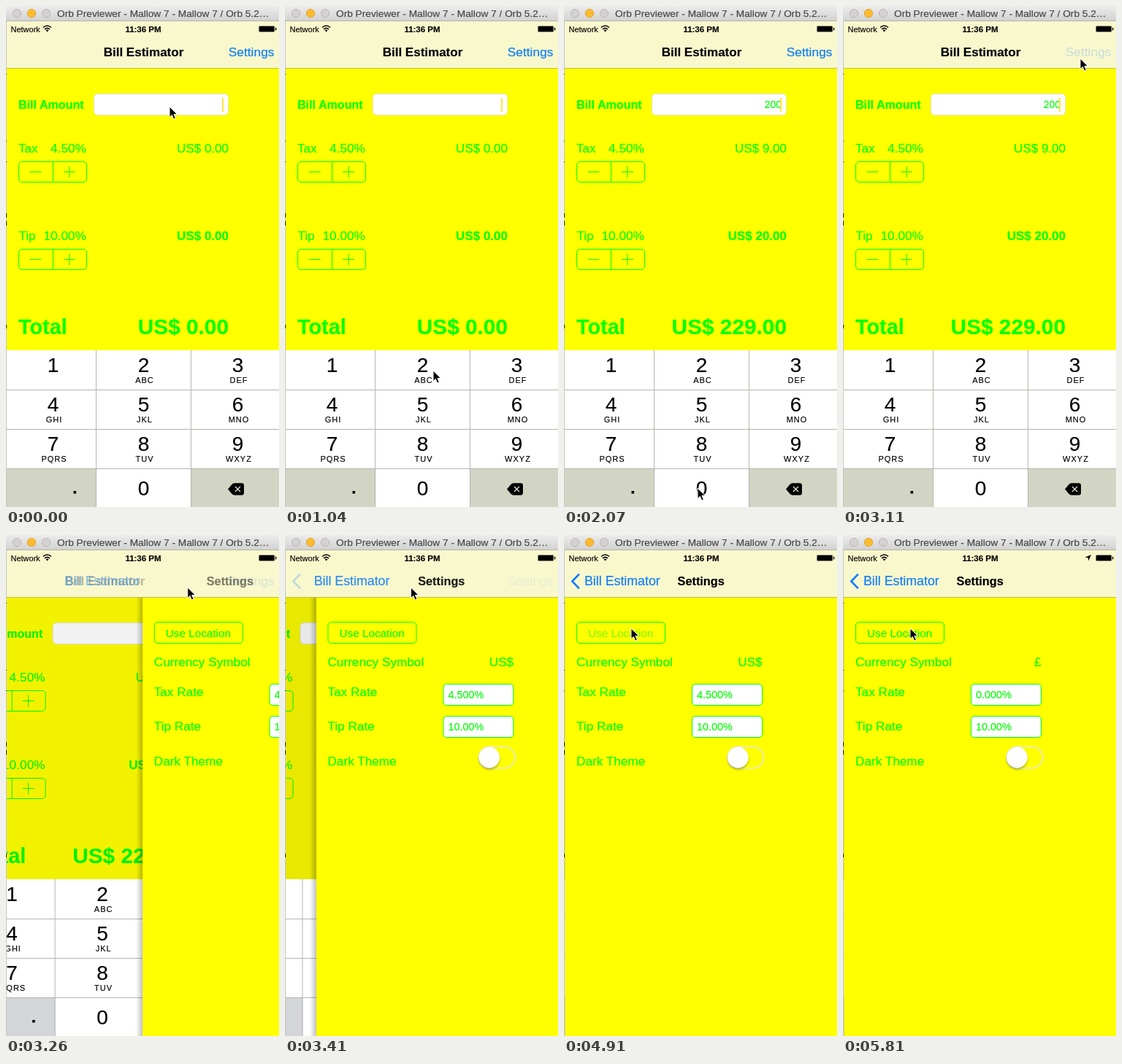
Recreate the animation shown at these times as an HTML page. Size 374x687 px, loop 8 s.

```html
<!DOCTYPE html>
<html lang="en">
<head>
<meta charset="utf-8">
<title>Bill Estimator</title>
<style>
  html, body { margin: 0; width: 100%; height: 100%; overflow: hidden; background: #ff0; }
  svg { display: block; width: 100%; height: 100%; }
  text { font-family: "Liberation Sans", Arial, Helvetica, sans-serif; white-space: pre; }
</style>
</head>
<body>
<svg id="stage" viewBox="0 0 374 687">
  <defs>
    <linearGradient id="chrome" x2="0" y2="1">
      <stop stop-color="#ececec"/><stop offset="1" stop-color="#d2d2d2"/>
    </linearGradient>
    <linearGradient id="edge">
      <stop stop-color="#000" stop-opacity="0"/><stop offset="1" stop-color="#000" stop-opacity=".25"/>
    </linearGradient>
    <filter id="soft" x="-50%" y="-50%" width="200%" height="200%">
      <feDropShadow dx="0" dy="2.5" stdDeviation="1.5" flood-opacity=".3"/>
    </filter>
    <clipPath id="screen"><rect x="1" y="21" width="373" height="666"/></clipPath>
  </defs>
</svg>
<script>
const GREEN = '#00ff00', BLUE = '#0a7aff', LOOP = 8000;
const stage = document.getElementById('stage');

function add(parent, tag, attrs, content) {
  const node = document.createElementNS('http://www.w3.org/2000/svg', tag);
  for (const key in attrs) node.setAttribute(key, attrs[key]);
  if (content !== undefined) node.textContent = content;
  parent.appendChild(node);
  return node;
}
const group = (parent, attrs = {}) => add(parent, 'g', attrs);
const rect = (parent, x, y, width, height, fill, more = {}) =>
  add(parent, 'rect', { x, y, width, height, fill, ...more });
const path = (parent, d, stroke, width = 1, fill = 'none') =>
  add(parent, 'path', { d, stroke, 'stroke-width': width, fill });
const label = (parent, str, x, y, size, fill = GREEN, more = {}) =>
  add(parent, 'text', { x, y, 'font-size': size, fill, stroke: fill, 'stroke-width': .15, ...more }, str);

const BOLD = { 'font-weight': 700 };
const END = { 'text-anchor': 'end' };
const MID = { 'text-anchor': 'middle' };
const box = { stroke: GREEN, rx: 4.5 };

// Calculator view
const screen = group(stage, { 'clip-path': 'url(#screen)' });
const calc = group(screen);
rect(calc, 0, 85, 374, 602, '#ff0');
label(calc, 'Bill Amount', 17, 141, 16.1, GREEN, BOLD);
rect(calc, 120.5, 120.5, 184, 29, '#fff', { rx: 5, stroke: '#e4e4c8' });
const bill = label(calc, '', 298, 140, 14, GREEN, END);
const caret = rect(calc, 296, 126, 2, 19, '#ffe63c');

function stepper(y) {
  rect(calc, 17.5, y + .5, 93, 28, 'none', box);
  path(calc, `M64.5 ${y + 1}v28M32.5 ${y + 14.5}h16M79 ${y + 14.5}h16M87 ${y + 6.5}v16`, GREEN);
}
label(calc, 'Tax', 17, 201, 17);
label(calc, '4.50%', 110, 201, 17.3, GREEN, END);
stepper(213);
label(calc, 'Tip', 17.5, 321, 17);
label(calc, '10.00%', 110, 321, 17.3, GREEN, END);
stepper(333);
label(calc, 'Total', 17, 450, 28.8, GREEN, BOLD);
const tax = label(calc, '', 305, 201, 17, GREEN, END);
const tip = label(calc, '', 305, 321, 17, GREEN, { ...END, ...BOLD });
const total = label(calc, '', 305, 450, 29.8, GREEN, { ...END, ...BOLD });
const dim = rect(calc, 0, 85, 374, 387, '#000', { opacity: 0 });

// Number pad
const cols = [[0, 124, 64.5], [124, 130, 188.5], [254, 120, 317.5]];
const letters = ['', 'ABC', 'DEF', 'GHI', 'JKL', 'MNO', 'PQRS', 'TUV', 'WXYZ'];
rect(calc, 0, 472, 374, 215, '#fff');
const sideKeys = [0, 2].map(c => rect(calc, cols[c][0], 634, cols[c][1], 53, '#d2d5c3'));
const pressed = {
  2: rect(calc, 124, 472, 130, 54, '#d2d5c3'),
  0: rect(calc, 124, 634, 130, 53, '#d2d5c3')
};
path(calc, 'M0 526.5H374M0 580.5H374M0 634.5H374M123.5 472V687M253.5 472V687', '#b4b4b0');
letters.forEach((str, i) => {
  const x = cols[i % 3][2], y = 472 + 54 * Math.floor(i / 3);
  label(calc, i + 1, x, y + 30, 28, '#000', MID);
  label(calc, str, x + 1.5, y + 45, 11, '#000', { ...MID, 'letter-spacing': 1 });
});
label(calc, '0', 188.5, 671, 28, '#000', MID);
rect(calc, 92.5, 665, 3.6, 3.6, '#000');
path(calc, 'M304 662.5l5.5-6.5q1.5-1.8 3.5-1.8h10q3 0 3 3v10.6q0 3-3 3h-10q-2 0-3.5-1.8z', 'none', 0, '#000');
path(calc, 'M314 659l7 7M321 659l-7 7', '#e8eadc', 1.2);

// Settings view
const prefs = group(screen);
rect(prefs, -7.5, 85, 9, 602, 'url(#edge)');
rect(prefs, 1.5, 85, 380, 602, '#ff0');
rect(prefs, 17.5, 119.5, 121, 29, 'none', box);
const locate = label(prefs, 'Use Location', 33, 140, 15.3);
[['Currency Symbol', 180], ['Tax Rate', 221], ['Tip Rate', 268], ['Dark Theme', 316]]
  .forEach(([str, y]) => label(prefs, str, 17, y, 17.2));
const symbol = label(prefs, '', 271.5, 180, 17, GREEN, END);
function field(y) {
  rect(prefs, 175.5, y + .5, 96, 29, '#fff', box);
  return label(prefs, '10.00%', 182, y + 20, 14.4);
}
const taxRate = field(204);
field(248);
rect(prefs, 224, 290.2, 49.5, 29.6, 'none', { rx: 14.8, stroke: '#e5e5e5', 'stroke-width': 1.5 });
add(prefs, 'circle', { cx: 238.5, cy: 305, r: 14.2, fill: '#fff', filter: 'url(#soft)' });

// Navigation and status bars
rect(stage, 0, 20, 374, 65, '#f9f8cd');
path(stage, 'M0 85.5H374', '#c0bf40');
const title = label(stage, 'Bill Estimator', 188.5, 69, 17, '#000', { ...MID, ...BOLD });
const open = label(stage, 'Settings', 367.5, 69, 17.4, BLUE, END);
const back = label(stage, 'Bill Estimator', 28, 69, 17.8, BLUE);
const chevron = path(stage, 'M20.8 53.7l-9.5 9.8 9.5 9.8', BLUE, 2.6);
const heading = label(stage, 'Settings', 187.7, 69, 16.3, '#000', { ...MID, ...BOLD });

label(stage, 'Network', 6.5, 35.5, 11, '#000');
path(stage, 'M51 29.5q5.5-5 11 0M53 32q3.5-3.2 7 0', '#000', 1.6);
path(stage, 'M54.5 33.3q2-1.6 4 0l-2 2.3z', 'none', 0, '#000');
label(stage, '11:36 PM', 188, 35.5, 11.5, '#000', { ...MID, ...BOLD });
const arrow = path(stage, 'M340 27l-3.7 8.5-.6-4.2-4.2-.6z', 'none', 0, '#000');
rect(stage, 346.5, 27.5, 21.5, 8, '#000', { rx: 1.5, stroke: '#8c8c7c' });
rect(stage, 369, 29.8, 1.5, 3.5, '#222');

// Window frame
rect(stage, 0, 20, 1, 667, '#c4c4c0');
[[93, 1], [185, 1], [213, 1], [284, 6], [295, 6], [437, 5]].forEach(([y, h]) => rect(stage, 0, y, 1, h, '#222'));
rect(stage, 0, 0, 374, 20, 'url(#chrome)');
rect(stage, 0, 20, 374, 1, '#b5b5b0');
['#d6d1d1', '#fdbc2e', '#d6d1d1'].forEach((fill, i) =>
  add(stage, 'circle', { cx: 15 + 20 * i, cy: 10, r: 5.6, fill, stroke: i === 1 ? '#dd9d26' : '#b9b3b3', 'stroke-width': .9 }));
label(stage, 'Orb Previewer - Mallow 7 - Mallow 7 / Orb 5.2…', 70, 15, 13.7, '#444');

const pointer = path(stage, 'M0 0V14.5L3.3 11.4 5.7 17 8.3 15.9 5.9 10.4H10.5Z', '#fff', 1, '#000');

const ticks = Array.from({ length: 54 }, (_, n) => 150 * n - 10 * [3, 9, 14, 21].filter(k => n >= k).length);
const snap = t => ticks.filter(k => k <= t).pop() || 0;

// start, end, x and y at the end, ease-out power (0: ease in and out)
const moves = [
  [290, 1040, 203, 500, 0],
  [1330, 1630, 183, 661, 4],
  [2220, 2820, 325, 72, 0],
  [3110, 3410, 172.5, 72, 1],
  [3410, 3860, 82, 56, 2],
  [4010, 4460, 92, 128, 2]
];
function pointerAt(t) {
  let x = 224, y = 138;
  for (const [from, to, x1, y1, power] of moves) {
    if (t <= from) break;
    const u = Math.min(1, (t - from) / (to - from));
    const e = power ? 1 - (1 - u) ** power : u * u * (3 - 2 * u);
    x += (x1 - x) * e;
    y += (y1 - y) * e;
  }
  return [x, y];
}

const at = (steps, t) => steps.filter(s => s[0] <= t).pop()[1];
const within = (t, ...spans) => spans.some(([a, b]) => t >= a && t < b);
const entries = [[0, ''], [1330, '2'], [1780, '20'], [2070, '200']];
const openFade = [[0, 1], [3110, .2]];
const locateFade = [[0, 1], [4610, .2], [4910, .5], [5060, .8], [5210, 1]];
const money = v => 'US$ ' + v.toFixed(2);
const push = t => t < 3260 ? 0 : t >= 3710 ? 1 : 1 - Math.exp((3190 - t) / 100);

const set = (node, key, value) => node.setAttribute(key, value);
const fade = (node, value) => set(node, 'opacity', value);
const shift = (node, x, y = 0) => set(node, 'transform', `translate(${x} ${y})`);

function render(time) {
  const t = snap(time % LOOP);
  const p = push(t), rest = 1 - p;
  const amount = at(entries, t), value = Number(amount);

  bill.textContent = amount;
  tax.textContent = money(value * .045);
  tip.textContent = money(value * .1);
  total.textContent = money(value * 1.145);
  fade(caret, p > 0 || within(t, [590, 890], [2520, 2820]) ? 0 : 1);
  fade(pressed[2], within(t, [1190, 1330]) ? 1 : 0);
  fade(pressed[0], within(t, [1630, 1780], [1930, 2070]) ? 1 : 0);

  shift(calc, -112 * p);
  shift(prefs, 374 * rest + (p ? 0 : 12));
  fade(dim, .1 * p);
  sideKeys.forEach(key => set(key, 'fill', p ? '#d4d5d9' : '#d2d5c3'));

  shift(title, -105 * p);
  fade(title, rest ** 2);
  fade(open, at(openFade, t) * Math.sqrt(rest));
  shift(back, 105 * rest);
  fade(back, p);
  fade(chevron, p ** 12);
  shift(heading, 240 * rest);
  fade(heading, p);

  fade(locate, at(locateFade, t));
  fade(arrow, t >= 5660 ? 1 : 0);
  symbol.textContent = t >= 5810 ? '£' : 'US$';
  taxRate.textContent = t >= 5810 ? '0.000%' : '4.500%';
  shift(pointer, ...pointerAt(t));
}

const start = performance.now();
function loop() {
  render(performance.now() - start);
  requestAnimationFrame(loop);
}
loop();
</script>
</body>
</html>
```
